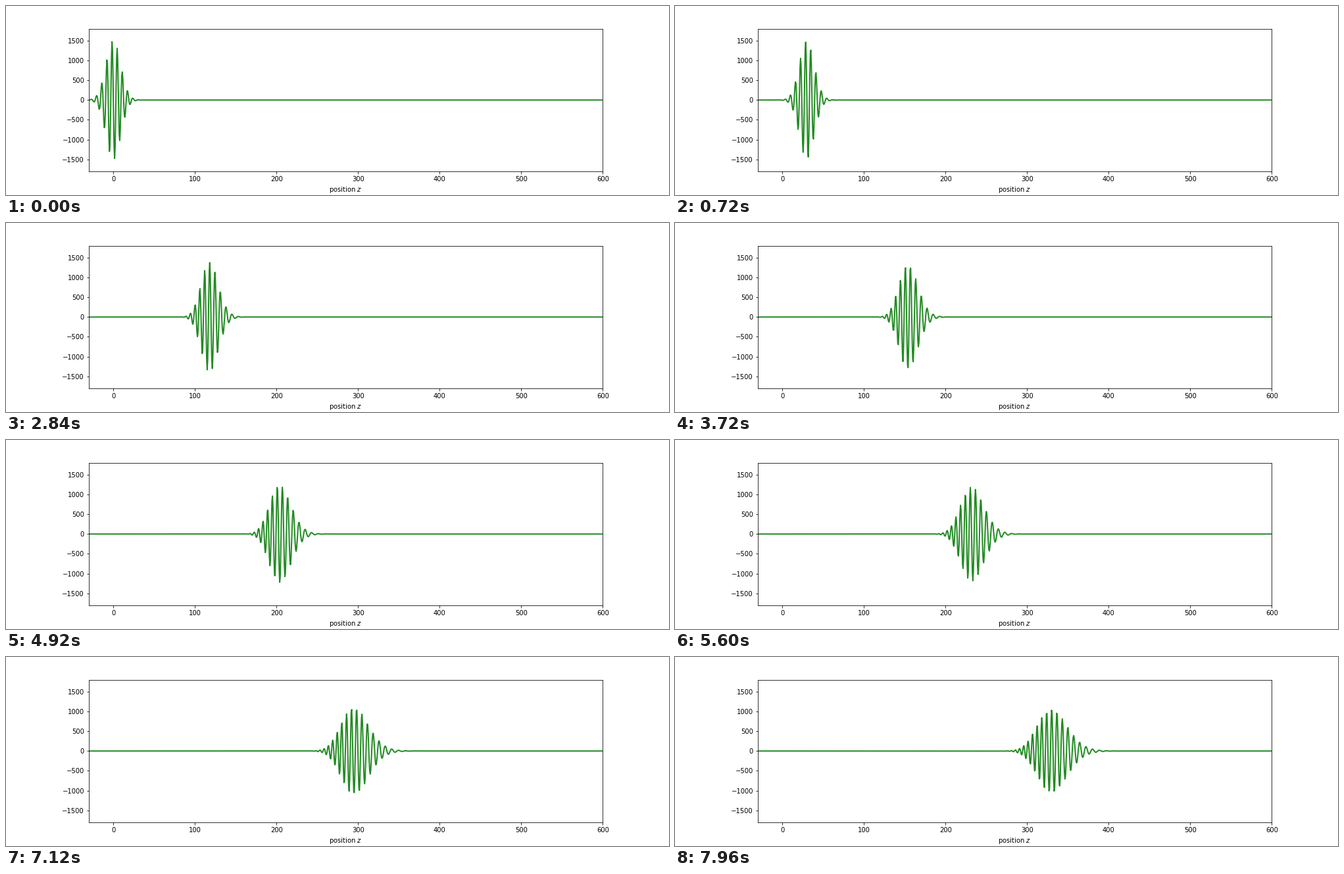
A matplotlib script for the animation above (8000 ms loop, 1008x288 px).

```python
import numpy as np
import matplotlib.pyplot as plt
from matplotlib.animation import FuncAnimation

FRAMES = 200
INTERVAL = 40  # ms

# Wave packet: time is counted in frames
AMPLITUDE = 1496
CARRIER = 2 * np.pi / 10      # carrier frequency
GROUP_SPEED = 1.66
DISPERSION = 0.157            # second derivative of k(omega)
BANDWIDTH = 0.185             # standard deviation of the spectrum

z = np.linspace(-30, 600, 1000)
detune = np.linspace(-5, 5, 401) * BANDWIDTH
weight = np.exp(-detune**2 / (2 * BANDWIDTH**2))
weight *= AMPLITUDE / weight.sum()
k = 1 + detune / GROUP_SPEED + DISPERSION * detune**2 / 2
modes = weight[:, None] * np.exp(-1j * np.outer(k, z))


def field(t):
    """Sum of all modes sin(omega t - k z) at time t."""
    return (np.exp(1j * (CARRIER + detune) * t) @ modes).imag


plt.rcParams.update({"font.family": "DejaVu Sans", "font.size": 10})
fig, ax = plt.subplots(figsize=(14, 4), dpi=72)
fig.subplots_adjust(left=0.125, right=0.9, bottom=0.125, top=0.88)
ax.set_xlim(-30, 600)
ax.set_ylim(-1800, 1800)
ax.set_yticks(range(-1500, 1501, 500))
ax.set_xlabel("position $z$")
line, = ax.plot(z, field(0), color="forestgreen", lw=2)


def update(frame):
    line.set_ydata(field(frame))
    return line,


anim = FuncAnimation(fig, update, frames=FRAMES, interval=INTERVAL,
                     repeat=True, repeat_delay=0)
plt.show()
```
